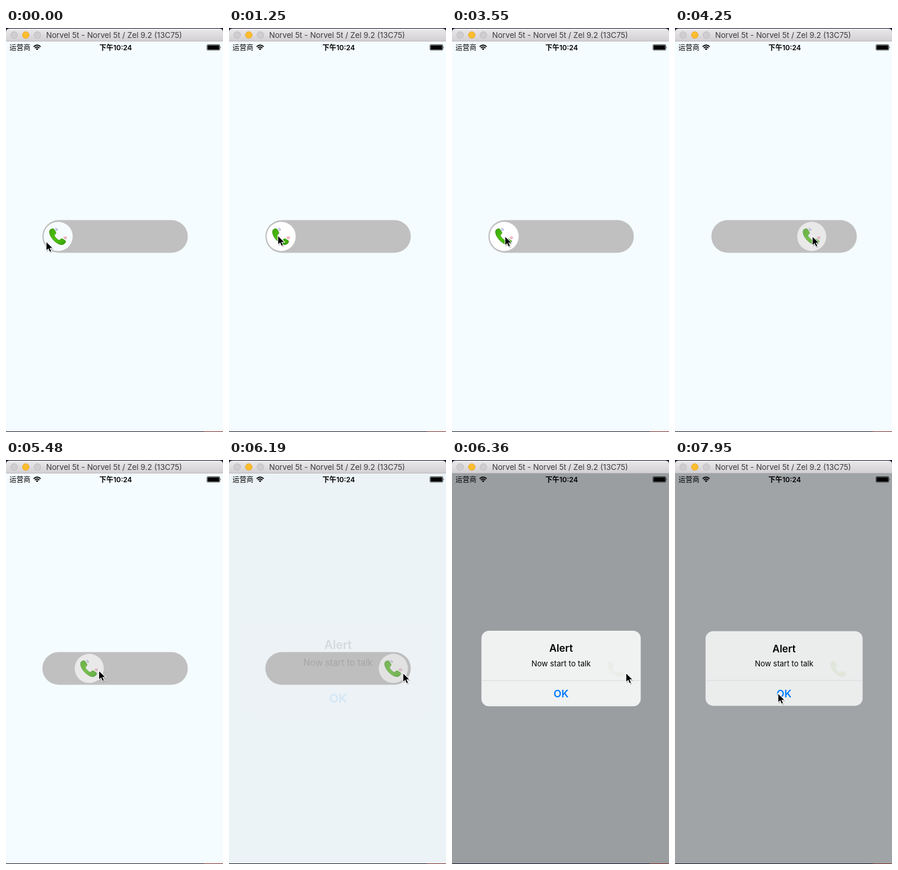
An HTML page for the animation above (8 s loop, 373 by 691 pixels).

```html
<!DOCTYPE html>
<html lang="zh">
<head>
<meta charset="utf-8">
<style>
html, body { margin: 0; width: 100%; height: 100%; overflow: hidden; background: #15152a; }
svg { display: block; }
text { font-family: Inter, "Noto Sans CJK SC", "Noto Sans CJK", sans-serif; }
.mid { text-anchor: middle; }
</style>
</head>
<body>
<svg width="373" height="691" viewBox="0 0 373 691">
  <defs>
    <linearGradient id="bar" x2="0" y2="1">
      <stop stop-color="#ece9ec"/><stop offset="1" stop-color="#d2cfd2"/>
    </linearGradient>
    <linearGradient id="green" x2="1" y2="1">
      <stop stop-color="#3fa60b"/><stop offset=".5" stop-color="#4fc20f"/><stop offset="1" stop-color="#36a006"/>
    </linearGradient>
    <path id="handset" d="M-15-8Q-15-12-11-13Q-8-14-7-12L-4-7Q-3-5-6-3Q-7-2-6 0Q-3 4 0 6Q2 7 3 6Q5 3 7 4L12 7Q14 9 12 11Q9 15 4 14C-4 12-15 1-15-8Z"/>
    <clipPath id="panelClip"><rect x="52.5" y="292.8" width="270" height="127.6" rx="13"/></clipPath>
  </defs>

  <rect y="23" width="373" height="667" fill="#f5fcff"/>
  <path d="M340 690.5h33" stroke="#7a2a28"/>

  <rect x="62.5" y="328.5" width="250" height="56" rx="28" fill="#c0c0c0"/>
  <g id="knob">
    <circle id="disc" r="25"/>
    <use href="#handset" fill="url(#green)" stroke="#2f8c08" stroke-width=".8"/>
    <g fill="none" stroke-width="1">
      <path d="M-5-14Q-1-14-1-10M-5-11.5Q-3-11.5-3-9.5" stroke="#7b82c8"/>
      <path d="M10 .5Q10 4 14 4M12.5 0Q12.5 2 15 2" stroke="#dc4a5c"/>
    </g>
  </g>

  <rect id="dim" y="23" width="373" height="667"/>

  <path d="M0 23V7Q0 1 6 1H367Q373 1 373 7V23Z" fill="url(#bar)"/>
  <path d="M0 22.5H373" stroke="#b9b6b9"/>
  <g stroke-width=".8">
    <circle cx="14" cy="12" r="5.8" fill="#d0cdd0" stroke="#b8b5b8"/>
    <circle cx="34" cy="12" r="5.8" fill="#fdbd2e" stroke="#e0a023"/>
    <circle cx="54" cy="12" r="5.8" fill="#d0cdd0" stroke="#b8b5b8"/>
  </g>
  <text x="69" y="17" font-size="13.2" fill="#3b393b">Norvel 5t - Norvel 5t / Zel 9.2 (13C75)</text>

  <text x="6" y="38" font-size="12">运营商</text>
  <g fill="none" stroke="#000" stroke-width="1.8">
    <path d="M47.5 32Q53.5 26.5 59.5 32M49.6 34.3Q53.5 30.8 57.4 34.3"/>
  </g>
  <path d="M51.2 35.6Q53.5 33.8 55.8 35.6L53.5 38Z"/>
  <text class="mid" x="188.5" y="38" font-size="12" font-weight="600">下午10:24</text>
  <rect x="345.5" y="28.5" width="22" height="9.5" rx="1.5" fill="none" stroke="#000" stroke-width=".7"/>
  <rect x="346.5" y="29.5" width="20" height="7.5" rx=".5"/>
  <path d="M368.7 31.5Q370.2 33.2 368.7 35Z"/>

  <g id="alert">
    <g clip-path="url(#panelClip)">
      <rect id="panel" x="52" y="292" width="271" height="129"/>
      <rect id="button" x="52" y="377" width="271" height="44" fill="#dcdddd"/>
      <path d="M52 377H323" stroke="#d3d5d6" stroke-width=".8"/>
    </g>
    <text class="mid" x="187.5" y="328.5" font-size="17" font-weight="600">Alert</text>
    <text class="mid" x="187.5" y="352.8" font-size="13">Now start to talk</text>
    <text class="mid" x="187.5" y="405.5" font-size="17.5" font-weight="600" fill="#007aff">OK</text>
  </g>
  <use id="ghost" href="#handset" x="282" y="357" fill="#a9c37a"/>

  <g id="cursor">
    <path d="M1 2V18L5 14.5 7.5 20 10.5 18.8 8 13.5H13Z" opacity=".25"/>
    <path d="M0 0V16.2L3.8 12.8 6.2 18.4 9.2 17.1 6.8 11.7H11.8Z" stroke="#fff" stroke-width="1.1"/>
  </g>
</svg>
<script>
const $ = id => document.getElementById(id);
const LOOP = 8000, SLACK = 8;

// Screen updates: start, end, number of steps
const bursts = [
  [0, 0, 1], [170, 440, 4], [890, 890, 1], [1250, 1340, 2], [1610, 2390, 10],
  [2930, 3720, 10], [3810, 4250, 6], [4520, 5300, 10], [5390, 6190, 10],
  [6280, 7060, 10], [7150, 7420, 4], [7770, 7770, 1], [7950, 7950, 1]
];

// Tracks: "time value [value]"
const track = s => s.split(',').map(k => k.trim().split(' ').map(Number));
const pointer = track(`0 69 365, 170 72 364, 440 84 358, 890 84 358, 1340 84 354, 1520 84 354,
  1950 121 352, 2390 182 352, 2840 182 352, 3100 165 374, 3460 91 356, 3550 91 356,
  3720 127 356, 4250 236 356, 4430 236 356, 4800 190 384, 5120 110 362, 5300 106 360,
  5390 125 360, 5480 160 360, 6010 299 364, 6400 299 364, 7060 224 422, 7420 177 399`);
const slide = track(`0 89.7, 1520 89.7, 1610 92, 1950 120.5, 2390 181, 2920 181, 2930 89.7,
  3550 89.7, 3720 126, 4250 235, 4510 235, 4520 89.7, 5300 89.7, 5390 109, 5480 143.5, 6010 282.5`);
const press = track(`0 1, 1520 1, 1610 .65, 2920 .65, 2930 .75, 3200 1, 3550 1, 3640 .65,
  4510 .65, 4520 .75, 4790 1, 5300 1, 5390 .65`);
const shade = track('0 0, 6100 0, 6190 .035, 6280 .25, 6360 .37, 6450 .4, 7770 .4, 7950 .35');
const fade = track('0 0, 6100 0, 6190 .1, 6280 .65, 6360 1');
const zoom = track('0 1.185, 6190 1.185, 6280 1.06, 6360 1.015, 6500 1');

function at(keys, t) {
  const i = keys.findIndex(k => k[0] > t);
  if (i < 0) return keys[keys.length - 1].slice(1);
  const a = keys[i - 1], b = keys[i], f = (t - a[0]) / (b[0] - a[0]);
  return a.slice(1).map((v, j) => v + (b[j + 1] - v) * f);
}

function snap(t) {
  const [start, end, n] = bursts.filter(b => b[0] <= t + SLACK).pop();
  if (n < 2) return start;
  const step = (end - start) / (n - 1);
  return start + step * Math.min(n - 1, Math.floor((t + SLACK - start) / step));
}

const set = (id, name, value) => $(id).setAttribute(name, value);

function draw(now) {
  const t = snap(now % LOOP), [scale] = at(zoom, t), [shown] = at(fade, t);
  const leaving = t >= 7950;
  set('cursor', 'transform', `translate(${at(pointer, t)})`);
  set('knob', 'transform', `translate(${at(slide, t)} 356.5)`);
  set('knob', 'opacity', at(press, t));
  set('disc', 'fill', t < 890 ? '#f6fbfe' : '#fff');
  set('dim', 'opacity', at(shade, t));
  set('alert', 'opacity', shown);
  set('alert', 'transform', `translate(187.5 356.5) scale(${scale}) translate(-187.5 -356.5)`);
  set('panel', 'fill', leaving ? '#ebecec' : '#f0f1f1');
  set('button', 'opacity', t >= 7770 && !leaving ? 1 : 0);
  set('ghost', 'opacity', shown < 1 ? 0 : leaving ? .14 : .08);
  requestAnimationFrame(() => draw(performance.now()));
}
draw(0);
</script>
</body>
</html>
```
